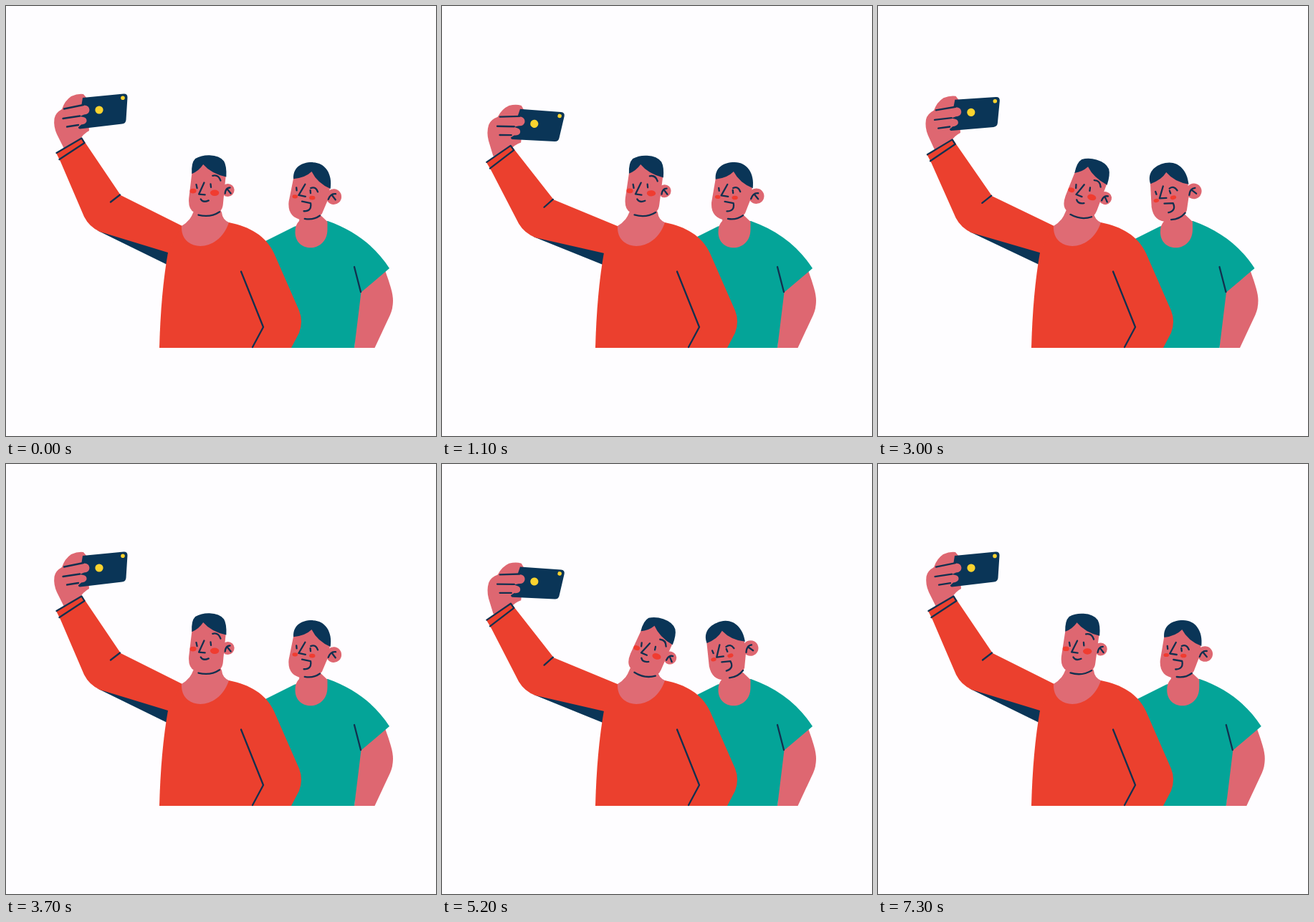
These frames come from a looping animation (600 by 600 pixels, 7.4 s). An HTML page:

```html
<!DOCTYPE html>
<html lang="en">
<head>
<meta charset="utf-8">
<title>Selfie</title>
<style>
  html, body { margin: 0; width: 100%; height: 100%; overflow: hidden; background: #fefdff; }
  svg { display: block; width: 100vw; height: 100vh; }
  .skin { fill: #de6771; }
  .neck { fill: #df6b74; }
  .navy { fill: #0a3557; }
  .red { fill: #eb402e; }
  .teal { fill: #04a498; }
  .yellow { fill: #fbd32f; }
  .cheek { fill: #f03c30; }
  .line { fill: none; stroke: #12304f; stroke-width: 2.3; stroke-linecap: round; stroke-linejoin: round; }
</style>
</head>
<body>
<svg viewBox="0 0 600 600">
  <g id="friend">
    <path class="skin" d="M529 369C536 389 540 401 540 411Q540 422 536 431L514.500 477H486L492 396Z"/>
    <path class="teal" d="M340 339L403 307.500L449 300C486 313 515 335 535 366L495.500 399.500L486 477H380Z"/>
    <path class="skin" d="M411 286L409 300Q403 306 403.500 316C404 345 448 345 448.500 312V301L438 291Z"/>
    <path class="line" d="M486 364L495 399"/>
    <g id="friendHead">
      <circle class="skin" cx="456.500" cy="265" r="10.800"/>
      <path class="skin" d="M400 238L394 274C393 289 400 297 414 299Q435 299 441 289L449 268L451 250L440 228H410Z"/>
      <path class="navy" d="M399.500 242C398 226 410 218 426 218C443 218 454 233 451.500 254Q433 247 424.500 231Q416 240 399.500 242Z"/>
      <ellipse class="cheek" cx="402.500" cy="266.500" rx="3.800" ry="2.600"/>
      <ellipse class="cheek" cx="426.500" cy="267.500" rx="4.200" ry="2.800"/>
      <path class="line" d="M416 249L407.500 264.500L417 266M404 254L404.500 258M423.500 257L424 261M424 254Q431 251 434 259M412.500 273L424.500 275Q427 286 415.500 286.500M417 297Q429 299 438 292M449 269Q452 260 459 261M454 263L459 269"/>
    </g>
  </g>

  <g id="arm">
    <path class="navy" d="M127 313L235 340V365L225 361Z"/>
    <g id="hand">
      <path class="skin" d="M81 199L71 179Q66 168 67.500 157Q69 149 78 144Q82 132 91 126Q100 122 108 123L113 129L116 174Q108 178 102 188L99 196Z"/>
      <path class="navy" d="M107 128L164 122.500Q169.500 122 169.500 127.500L167.500 159Q167 164 162 164.500L103 171.500Q100 171 101 166Z"/>
      <path class="skin" d="M84 143L108 138.500Q116 138 116.500 145Q116 151 109 151.500L103 154L108 155Q113 156 112.500 161Q111 165 105 165.500L99 171H82Z"/>
      <path class="line" d="M81 143.500L108 138M79.500 157L103 153.500M85 168.500L101 166"/>
      <circle class="yellow" cx="163" cy="128.300" r="2.800"/>
      <circle class="yellow" cx="130" cy="145" r="5.600"/>
    </g>
    <path class="red" d="M70 205L106 184L160 264L246 307L262 325L245 350L226 344L131 315Q116 308 109 294L76 217Z"/>
    <path class="line" d="M70.500 205L105.500 184.500L109.500 191L74.500 214M146 273.500L159 263.500"/>
  </g>

  <path class="red" d="M245 307L311 302C340 308 362 320 374 345L409 425Q415 440 409 456L398 477H214Q216 400 226 344Z"/>
  <path class="neck" d="M264 282L259 293Q254 302 245 307C243 344 297 346 311 302Q302 298 301 288L295 276Z"/>
  <path class="line" d="M328 370.500L359 448L344 476"/>
  <g id="selfHead">
    <circle class="skin" cx="310" cy="257.500" r="9"/>
    <path class="skin" d="M260.500 230L255.500 268Q254 284 263 288Q275 292 289 291Q302 289 303 277L307.500 236L295 218H268Z"/>
    <path class="navy" d="M260 234Q259 219 265 213Q274 208 285 208.500Q299 209 305 217Q309 224 308 239Q287 234 276 221Q270 230 260 234Z"/>
    <ellipse class="cheek" cx="261.500" cy="258" rx="4.500" ry="3.300"/>
    <ellipse class="cheek" cx="291.500" cy="261" rx="6.200" ry="4.200"/>
    <path class="line" d="M277 246.500L269.500 262.500L278 263.500M266 249L267 254M286 248.500L286.500 253M289 237Q297 235 300 244M272 269.500Q275 275 283 271.500M268.500 291.500Q285 296 298 287.500M306 262Q307 254 313 254M310 257L314 262"/>
  </g>
</svg>
<script>
const PERIOD = 3700, STEP = 100;

// Cosine ease from 0 to 1 between two times.
const ease = (t, start, end) => {
  const u = Math.min(1, Math.max(0, (t - start) / (end - start)));
  return (1 - Math.cos(Math.PI * u)) / 2;
};

const pose = (id, transform) => document.getElementById(id).setAttribute('transform', transform);

function draw() {
  const t = Math.floor(performance.now() / STEP) * STEP % PERIOD;
  const drop = ease(t, 0, 1200) - ease(t, 1200, PERIOD);
  const slide = ease(t, 0, 800) - ease(t, 2350, PERIOD);

  // The heads sway on a cycle of their own: apart, together, hold, apart.
  const swayTime = (t + PERIOD - 700) % PERIOD;
  const sway = ease(swayTime, 0, 1100) - ease(swayTime, 1550, PERIOD);

  pose('arm', `rotate(${-4.2 * drop} 245 325)`);
  pose('hand', `rotate(${14 * drop} 88 195)`);
  pose('friend', `translate(${-18 * slide} 0)`);
  pose('friendHead', `rotate(${9 - 29.5 * sway} 423 290)`);
  pose('selfHead', `rotate(${-8 + 30.5 * sway} 271 291)`);
  requestAnimationFrame(draw);
}
draw();
</script>
</body>
</html>
```
